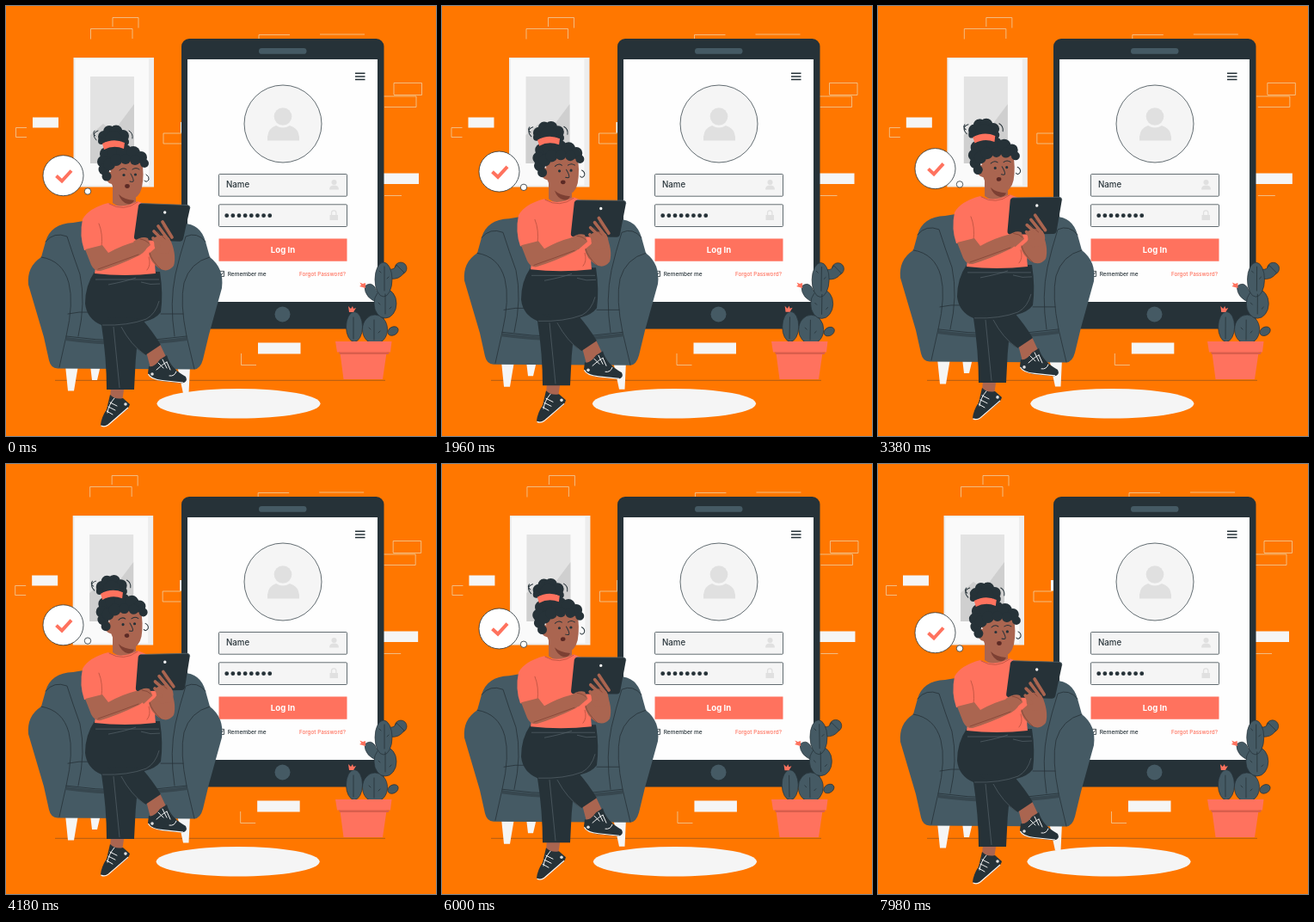
Recreate the animation shown at these times as an HTML page. Size 500 by 500 pixels, loop 8000 ms.

```html
<!DOCTYPE html>
<html lang="en">
<head>
<meta charset="utf-8">
<title>Log in</title>
<style>
  html, body { margin: 0; width: 100%; height: 100%; overflow: hidden; background: #ff7700; }
  svg { display: block; width: 100vw; height: 100vh; }
  text { font-family: Inter, "Open Sans", sans-serif; font-weight: 500; fill: #263238; }
  .dark { fill: #263238; }
  .slate { fill: #455a64; }
  .coral { fill: #ff725e; }
  .skin { fill: #aa6550; }
  .pale { fill: #f5f5f5; }
  .field { fill: #f5f5f5; stroke: #3c484e; stroke-width: .8; }
  .icon { fill: #e0e0e0; }
  .line { fill: none; stroke: #263238; stroke-width: .8; stroke-linecap: round; }
  .brick { fill: none; stroke: #efcfa2; stroke-width: .8; }
  .seam { fill: none; stroke: #56646b; stroke-width: .7; }
  .lace { fill: none; stroke: #f5f5f5; stroke-width: 1; stroke-linecap: round; }
  .ink { fill: none; stroke: #263238; stroke-width: 1; stroke-linecap: round; }
  .fold { fill: none; stroke: #b8513f; stroke-width: .8; stroke-linecap: round; }
  .hand { fill: none; stroke: #7d4033; stroke-width: .7; stroke-linecap: round; }
</style>
</head>
<body>
<svg viewBox="0 0 500 500">
  <rect width="500" height="500" fill="#ff7700"/>

  <g id="wall">
    <path class="brick" d="M124 24V13.500H154V25.500M147 38V26.500H98.500V38.500M451 103V89.500H483.500V103.500H451M438 105H477V117.500H440M24 141.500H11.500V152.500H24M204 148H183V160H204M273.500 404V417.500H291M294 38V33.500H330M365 33H417M440 220.500H460"/>
    <path class="pale" d="M31 129.500H61V141.500H31ZM203 135H230V147.500H203ZM293 391.500H342.500V404.500H293ZM420 194.500H480V207H420Z"/>
    <path fill="#ededed" d="M78.500 60H172V210.500H78.500Z"/>
    <path fill="#fafafa" d="M80.500 61.500H166V208.500H80.500Z"/>
    <path fill="#e3e3e3" d="M98 82H149V183H98Z"/>
    <path fill="#cfcfcf" d="M98 183V150L113 137 125 146 149 114V183Z"/>
    <ellipse class="pale" cx="270.500" cy="462.300" rx="95" ry="17.300"/>
  </g>

  <path d="M57 435.300H441" stroke="#a85a18" stroke-width=".9"/>

  <g>
    <rect class="dark" x="204" y="38" width="235.500" height="337.500" rx="9"/>
    <path fill="#fefefe" d="M211 62H432V344H211Z"/>
    <rect class="slate" x="294" y="49" width="55.500" height="6.800" rx="3.400"/>
    <circle class="slate" cx="321.500" cy="358.500" r="9"/>
    <path d="M406 78.300H417.500M406 82H417.500M406 85.600H417.500" stroke="#263238" stroke-width="1.500"/>
    <circle class="field" cx="322" cy="137" r="45"/>
    <circle class="icon" cx="322" cy="128.500" r="10.300"/>
    <path class="icon" d="M304 156.500V152Q305 142 314 139Q322 144 330 139Q340 142 341 152V156.500Z"/>
    <rect class="field" x="247.500" y="195.500" width="149" height="25.700" rx="1"/>
    <rect class="field" x="247.500" y="230.800" width="149" height="25.700" rx="1"/>
    <path class="coral" d="M247.500 270.500H396.500V296.700H247.500Z"/>
    <circle class="icon" cx="381.500" cy="205" r="3"/>
    <path class="icon" d="M376 213.500Q376 208.500 381.500 208.500T387 213.500ZM376.500 243H386V249H376.500Z"/>
    <path d="M378.500 243V240.500a2.700 2.700 0 0 1 5.400 0V243" fill="none" stroke="#e0e0e0" stroke-width="1.300"/>
    <path d="M256.700 243.700H307" stroke="#263238" stroke-width="4.800" stroke-linecap="round" stroke-dasharray="0 7.150"/>
    <text x="256" y="211" font-size="9.700">Name</text>
    <text x="322" y="287" font-size="9.600" text-anchor="middle" style="fill:#fff;font-weight:700">Log In</text>
    <rect x="247.300" y="308.300" width="6.200" height="6.200" fill="#fff" stroke="#263238" stroke-width=".8"/>
    <path class="ink" d="M248.700 311.500l1.300 1.500 2.400-3"/>
    <text x="257.700" y="313.800" font-size="6.500">Remember me</text>
    <text x="341" y="313.800" font-size="6.300" style="fill:#ff725e">Forgot Password?</text>
  </g>

  <g id="cactus">
    <g class="slate" stroke="#263238" stroke-width=".7">
      <ellipse cx="450" cy="378" rx="6.500" ry="4.800" transform="rotate(-30 450 378)"/>
      <ellipse cx="429" cy="376" rx="14.500" ry="17"/>
      <ellipse cx="405" cy="373" rx="9.500" ry="17.500"/>
      <path d="M417 326Q424 320 429 327Q431 333 437 335L433 345Q417 340 417 326Z"/>
      <ellipse cx="441" cy="346" rx="13" ry="17"/>
      <ellipse cx="459" cy="305" rx="7" ry="7"/>
      <path d="M446 306Q452 307 454 301L463 310Q457 319 446 317Z"/>
      <ellipse cx="439" cy="318" rx="10" ry="20"/>
    </g>
    <path class="line" d="M440 303V331M441 335V358M428 365V388M404 362V387M434 308l2 2M445 315l-2 2M433 345l2 2M448 350l-2 2M422 374l2 2M435 378l-2 2"/>
    <path class="coral" d="M418 328l-7-2 2-1.500-1.500-3 3.300 1.500 3.200-1ZM399 356l-1-7 3 3 2-3 1 3 3-1-3 5Z"/>
  </g>
  <path class="coral" d="M388 400H443L438 434H392.500ZM383 390H448.500L447 402.500H385Z"/>
  <path d="M387 402.500H446L444.500 405H388Z" fill="#d95e4c"/>

  <g id="sitter">
    <circle cx="66.500" cy="197.200" r="23.500" fill="#fff" stroke="#263238" stroke-width=".8"/>
    <circle cx="95" cy="215.500" r="3.700" fill="#fff" stroke="#263238" stroke-width=".8"/>
    <path d="M58.500 197.500l6.500 6 11-12" fill="none" stroke="#ff725e" stroke-width="4"/>

    <path class="pale" d="M69 418H84L79 447.500H72ZM98 418H110L106 435H100ZM199 418H214L212.500 450.500H206Z"/>
    <path class="slate" d="M78 252Q52 253 46 274L41 292Q24 303 26 324L44 385 50 412Q52 421 60 421.500L219 422.500Q226 422 229 411L236 382 251 328Q254 305 237 292L232 274Q226 253 206 253L150 240Z"/>
    <path class="line" d="M41 292Q66 296 73 322Q79 345 70 384L62 420M46 274Q56 262 71 268Q78 290 86 312Q93 345 84 384M237 292Q214 298 207 322Q202 345 210 384L219 422M232 274Q222 262 209 268Q202 290 197 312Q190 345 196 384M70 384Q140 394 210 384M72 358Q100 352 116 362M180 358L206 358"/>
    <path d="M70 385Q140 395 210 385L211 389Q140 399 69 389Z" fill="#37474f"/>

    <!-- far leg, shoes, near leg -->
    <path class="skin" d="M122 440H138L135 460 121 458ZM163 402L179 393 187 410 169 425Z"/>
    <path class="dark" d="M121 452Q127 458 136 456L144 463Q143 468 137 472L118 487Q112 491 110 487Q111 478 117 469ZM166 419Q172 421 179 411L187 406Q191 421 209 431Q212 437 205 438.500L180 436Q166 433 165 427Z"/>
    <path class="lace" d="M121 461l8 4M119 466l8 4M117 471l7 4M126 456q-7 8-8 17M177 415l6 6M182 411l5 10M187 414l4 9M175 423q9-8 12-9M190 430q6 1 8-5"/>
    <path d="M110.500 488Q115 490 119 487L142 467M165.500 428Q168 434 182 435.500L206 438" fill="none" stroke="#f5f5f5" stroke-width="1.200"/>
    <circle cx="139" cy="463" r="1.800" fill="#e0e0e0"/>
    <circle cx="170" cy="428" r="1.800" fill="#e0e0e0"/>
    <path class="dark" d="M103 309H179Q183 335 180 356Q174 364 161 367L154 377Q150 412 149 446H117Q117 410 111 371Q94 364 92 346Q92 325 103 309Z"/>
    <path class="dark" d="M116 363Q148 362 158 364Q171 379 180 394L162 406Q143 394 134 371Z"/>
    <path class="seam" d="M104 318H178M112 371Q142 372 163 364Q174 358 178 343M119 324Q140 320 151 316M134 373Q145 394 162 406M125 373L132 444M157 321Q168 325 179 323"/>

    <!-- torso and arms -->
    <path class="skin" d="M124 205H151V229Q139 240 124 229Z"/>
    <path class="coral" d="M119 229Q135 237 153 227Q171 233 185 246Q192 258 191 272L175 283Q172 297 174 311Q138 315 103 311L107 285 91 284Q85 267 89 248Q96 235 119 229Z"/>
    <path class="fold" d="M108 253Q113 265 111 281M106 302Q125 303 136 294M166 292Q169 301 164 307M120 230Q137 240 153 228"/>
    <path class="skin" d="M92 283L112 278 119 287Q135 278 151 274L166 275Q164 285 155 290Q130 302 110 308Q103 309 99 301ZM178 275L190 269Q199 289 195 302Q188 311 178 305Q168 298 166 288L173 282Z"/>
    <path class="hand" d="M107 306Q130 298 154 289M180 306Q169 296 167 287"/>

    <g id="tablet">
      <path class="dark" d="M157 229.500L211 231.500Q214.500 232 214 235L206 271Q205 274 202 273.800L152 272Q148.500 271.500 149 268L154 232Q155 229.500 157 229.500Z"/>
      <path d="M157 229.500L211 231.500Q214 232 214 235" fill="none" stroke="#56646b" stroke-width=".8"/>
      <circle cx="184.700" cy="240" r="1.700" fill="#f5f5f5"/>
      <path class="skin" d="M173 269Q182 264 190 270Q195 278 189 287L177 288Q170 280 173 269Z"/>
      <path d="M182 251L193 269M177 256L188 271M172 262L182 272M171 270L178 279" fill="none" stroke="#aa6550" stroke-width="3.700" stroke-linecap="round"/>
      <path class="skin" d="M148 274Q158 267 165 270L168 278 157 287Z"/>
      <path class="hand" d="M182 256L190 268M176 262L185 271M156 271Q163 272 166 276"/>
    </g>

    <g id="head">
      <g id="bun" class="dark"></g>
      <path class="skin" d="M119 186Q135 176 158 181Q161 195 158 211Q155 224 143 226Q128 224 123 207Q115 205 116 196Q117 191 122 193Z"/>
      <g id="curls" class="dark"></g>
      <path class="coral" d="M112 160Q125 153 138 159L137 166Q125 161 114 167Z"/>
      <path class="ink" d="M132 191q4-4 8-1M147 190q4-3 8 0M145 195Q149 202 148 204Q147 205 144 204M163 196q4 2 3 6q-3 4-5 1M105 156q-7-8 2-11M143 145q5 3 4 9M104 151q-4-3-1-6"/>
      <circle class="dark" cx="137" cy="196.500" r="1.600"/>
      <circle class="dark" cx="150.500" cy="196" r="1.600"/>
      <ellipse cx="141" cy="209.500" rx="2.800" ry="2.400" fill="#5c2a25"/>
      <path d="M131 219Q137 225 149 226Q147 231 141 230Q134 228 131 219Z" fill="#7d4033"/>
    </g>
  </g>
</svg>

<script>
  const LOOP = 8000;
  const byId = id => document.getElementById(id);
  const parts = Object.fromEntries(
    ['wall', 'cactus', 'sitter', 'tablet', 'head'].map(id => [id, byId(id)]));

  const addBlobs = (id, blobs) => {
    byId(id).innerHTML = blobs.map(([x, y, r]) => `<circle cx="${x}" cy="${y}" r="${r}"/>`).join('');
  };
  addBlobs('bun', [[114, 152, 7], [120, 146, 7], [128, 146, 7.5], [136, 151, 7], [139, 158, 4], [125, 155, 10], [111, 157, 4]]);
  addBlobs('curls', [[117, 172, 8], [126, 169, 9], [137, 169, 9], [148, 171, 8], [157, 176, 7], [161, 183, 5],
    [113, 181, 7], [114, 190, 6.5], [117, 198, 5.5], [120, 184, 7], [128, 179, 7], [139, 178, 6], [150, 179, 6]]);

  // Evenly spaced keys, linear between them; progress runs from 0 to 1.
  const tween = (keys, progress) => {
    const pos = progress * (keys.length - 1);
    const i = Math.min(Math.floor(pos), keys.length - 2);
    return keys[i] + (keys[i + 1] - keys[i]) * (pos - i);
  };
  const SHAKE = [0, -1, 2, -4, 4, -4, 4, -4, 2, -1, 0];
  const FLOAT = [0, 1, 0];
  const WIND = [0, 1, 0, -1, 0];

  // Three steps every 140 ms, held for 20, 100 and 20 ms.
  const stepAt = ms => {
    const rest = ms % 140;
    return 3 * Math.floor(ms / 140) + (rest < 20 ? 0 : rest < 120 ? 1 : 2);
  };

  function draw(now) {
    const step = stepAt(now % LOOP);
    const cycle = step / 180;
    const lift = tween(FLOAT, cycle);
    const place = (id, transform) => parts[id].setAttribute('transform', transform);
    place('wall', `translate(${tween(SHAKE, step / 360)} 0)`);
    place('sitter', `translate(0 ${-10 * lift})`);
    place('tablet', `rotate(${-3.5 * lift} 188 238)`);
    place('head', `rotate(${-1.8 * lift} 138 226)`);
    place('cactus', `rotate(${tween(WIND, cycle)} 416 390)`);
    requestAnimationFrame(draw);
  }
  draw(0);
</script>
</body>
</html>
```
